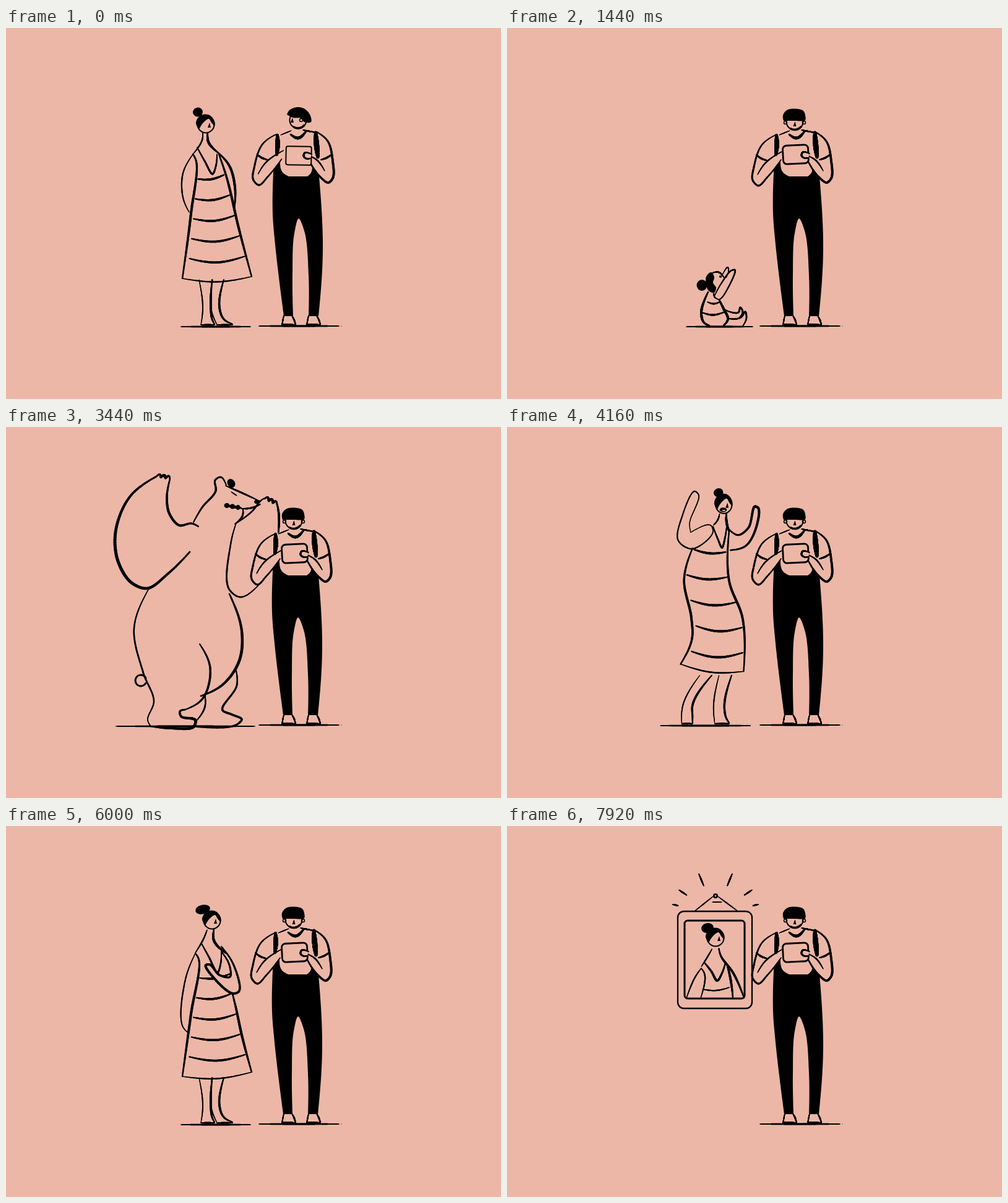
Animation of 800x600 px, one loop 8 s. Source, as an HTML page with a canvas:

```html
<!DOCTYPE html>
<html lang="en">
<head>
<meta charset="utf-8">
<title>Shape shifter</title>
<style>
html, body { margin: 0; width: 100%; height: 100%; overflow: hidden; background: #ecb7a6; }
canvas { display: block; }
</style>
</head>
<body>
<canvas id="stage" width="800" height="600"></canvas>
<script>
const ctx = document.getElementById('stage').getContext('2d');
const PAPER = '#ecb7a6', INK = '#000', FLOOR = 480;
const LOOP = 8000, CYCLE = 5760, STEP = 80, SAMPLES = 80;
const SWAP = { baby: 960, portrait: 1840, bear: 3120, shout: 4000 };

const clamp = v => Math.max(0, Math.min(1, v));
const smooth = v => { v = clamp(v); return v * v * (3 - 2 * v); };
const lerp = (a, b, k) => a + (b - a) * k;
const mix = (a, b, k) => Array.isArray(a) ? a.map((v, i) => mix(v, b[i], k)) : lerp(a, b, k);

// Smooth curve through a few points, sampled evenly; knots follow the chord lengths.
function through(pts) {
  const n = pts.length - 1;
  const h = [], d = [], m = [];
  for (let i = 0; i < n; i++) {
    const [a, b] = [pts[i], pts[i + 1]];
    h[i] = Math.hypot(b[0] - a[0], b[1] - a[1]) ** 0.7 || 0.01;
    d[i] = [0, 1].map(j => (b[j] - a[j]) / h[i]);
  }
  for (let i = 1; i < n; i++) m[i] = mix(d[i - 1], d[i], h[i - 1] / (h[i - 1] + h[i]));
  m[0] = n > 1 ? mix(m[1], d[0], 1.6) : d[0];
  m[n] = n > 1 ? mix(m[n - 1], d[n - 1], 1.6) : d[0];
  const total = h.reduce((a, b) => a + b), out = [];
  for (let s = 0; s <= SAMPLES; s++) {
    let t = total * s / SAMPLES, i = 0;
    while (i < n - 1 && t > h[i]) t -= h[i++];
    const u = t / h[i], v = 1 - u;
    out.push([0, 1].map(j =>
      v * v * (1 + 2 * u) * pts[i][j] + u * u * (3 - 2 * u) * pts[i + 1][j] +
      h[i] * u * v * (v * m[i][j] - u * m[i + 1][j])));
  }
  return out;
}

const cache = {};
function points(text) {
  const v = text.split(' ').map(Number);
  return v.filter((_, i) => i % 2 === 0).map((x, i) => [x, v[2 * i + 1]]);
}
const curve = text => cache[text] ||= through(points(text));
const asCurve = c => typeof c === 'string' ? curve(c) : c;

// Brush line: full in the middle, thin at the ends.
function ink(line, width = 2.5) {
  const c = asCurve(line);
  for (let i = 1; i < c.length; i++) {
    ctx.lineWidth = width * (0.55 + 0.45 * Math.sin(Math.PI * i / c.length));
    ctx.beginPath();
    ctx.moveTo(...c[i - 1]);
    ctx.lineTo(...c[i]);
    ctx.stroke();
  }
}
const inkAll = (lines, width) => lines.forEach(l => ink(l, width));

function fill(pts, color = INK) {
  ctx.fillStyle = color;
  ctx.beginPath();
  pts.forEach(p => ctx.lineTo(...p));
  ctx.fill();
}
function filled(line, width) {
  fill(asCurve(line), PAPER);
  ink(line, width);
}
function oval(x, y, rx, ry = rx, color = INK, angle = 0) {
  ctx.fillStyle = color;
  ctx.beginPath();
  ctx.ellipse(x, y, rx, ry, angle, 0, 7);
  ctx.fill();
}
function ring(x, y, r, width, from = 0, to = 7) {
  ctx.lineWidth = width;
  ctx.beginPath();
  ctx.arc(x, y, r, from, to);
  ctx.stroke();
}
function panel(x, y, w, h, r, width) {
  ctx.beginPath();
  ctx.roundRect(x - w / 2, y - h / 2, w, h, r);
  ctx.fillStyle = PAPER;
  ctx.fill();
  ctx.lineWidth = width;
  ctx.stroke();
}
function nose(x, y) { fill([[x, y], [x - 3, y + 8], [x + 2, y + 8]]); }
function ground(x0, x1, y = 483) { ink(through([[x0, y], [x1, y]]), 3); }

// Runs paint inside a transform around (x, y).
function around(x, y, change, paint) {
  ctx.save();
  ctx.translate(x, y);
  change();
  ctx.translate(-x, -y);
  paint();
  ctx.restore();
}

function makePose(p) {
  for (const key of ['neckL', 'neckR', 'vee', 'armL', 'armR', 'sideL', 'sideR']) p[key] = curve(p[key]);
  return p;
}
// head: x, y, bun x, y, radii; legs: hips, knees, heel, toe; bands: first, step, tilt.
const calm = makePose({
  head: [323, 156, 310, 136, 8, 7.5],
  neckL: '318 169 317 181 303 203',
  neckR: '326 169 327 184 342 201',
  vee: '309 193 321 215 334 236 339 224 341 204',
  armL: '303 203 286 235 286 274 296 298',
  armR: '342 201 361 223 370 257 369 292',
  sideL: '302 204 307 214 299 300 285 405',
  sideR: '344 204 357 243 376 323 397 402',
  legs: [[312, 333, 318, 331, 315, 337], [334, 352, 331, 345, 341, 366]],
  bands: [0.2, 0.16, -7], floor: [283, 395]
});
const chest = makePose({
  ...calm,
  head: [333, 153, 318, 135, 12, 7.5],
  neckL: '325 168 319 183 306 205',
  neckR: '336 168 336 185 356 206',
  vee: '316 190 328 212 342 237 347 222 348 204',
  armL: '306 206 290 248 286 325 294 334',
  armR: '348 195 368 225 376 268 368 271 337 247 323 225 329 224 345 241 362 244 361 225 348 203',
  sideL: '306 206 311 214 299 304 285 405',
  sideR: '366 271 372 296 381 338 397 398'
});
const shout = makePose({
  head: [351, 149, 342, 131, 8, 6.5],
  neckL: '344 163 341 172 334 180',
  neckR: '355 163 356 178 360 190',
  vee: '333 182 341 201 348 214 353 199 356 180',
  armL: '296 191 294 178 309 134 303 129 282 166 275 203 297 216 333 190 330 181 296 191',
  armR: '358 185 375 195 392 184 403 152 408 154 404 186 388 211 362 218',
  sideL: '299 215 285 262 297 320 298 352 279 390',
  sideR: '360 187 360 265 382 320 384 401',
  legs: [[311, 331, 283, 299, 281, 299], [343, 364, 334, 352, 336, 360]],
  bands: [0.01, 0.22, 4], floor: [246, 395]
});
function blend(a, b, k) {
  return Object.fromEntries(Object.keys(a).map(key => [key, mix(a[key], b[key], k)]));
}

function womanHead([x, y, bx, by, rx, ry], yelling) {
  oval(bx, by, rx, ry, INK, -0.2);
  oval(x, y, 14, 14, PAPER);
  ring(x, y, 13.5, 2);
  around(0, 0, () => ctx.translate(x, y), () => {
    fill(curve('-11 8 -16 -3 -8 -15 6 -15 14 -5 14 2 9 -3 5 -9 -4 -3 -11 8'));
    nose(6, -3);
    if (yelling) {
      oval(-1, 8, 6, 3.5);
      oval(0, 9, 3, 1, PAPER);
    }
  });
}

function leg([hipBack, hipFront, kneeBack, kneeFront, heel, toe]) {
  const back = through([[hipBack, 407], [kneeBack, 452], [heel, FLOOR]]);
  const front = through([[hipFront, 407], [kneeFront, 452], [lerp(kneeFront, toe, 0.3), 470], [toe, FLOOR - 1]]);
  ink(back, 2);
  ink(front, 3.5);
  ink(through([[heel, FLOOR], [toe, FLOOR]]), 2.5);
}

const sag = (a, b, depth) => through([a, [(a[0] + b[0]) / 2, (a[1] + b[1]) / 2 + depth], b]);
const edgeAt = (side, y) => (side.find(p => p[1] >= y) || side[SAMPLES])[0];

function drawWoman(w, yelling) {
  const [top, bottom] = [w.sideL[0][1], w.sideL[SAMPLES][1]];
  const [first, step, tilt] = w.bands;
  for (let i = 0; i < 5; i++) {
    const y = lerp(top, bottom, first + step * i), y2 = y + tilt * (1 - i / 8);
    ink(sag([edgeAt(w.sideL, y) + 3 + i, y], [edgeAt(w.sideR, y2) - 3, y2], 4 + i), 3.5);
  }
  ink(w.vee, 3);
  fill(w.armR, PAPER);
  w.legs.forEach(leg);
  ink(sag(w.sideL[SAMPLES], w.sideR[SAMPLES], 7), 2.3);
  inkAll([w.neckL, w.armL], 2.3);
  inkAll([w.neckR, w.armR, w.sideL, w.sideR], 4);
  ground(...w.floor);
  womanHead(w.head, yelling);
}

function drawBaby(p) {
  const raise = (1 - smooth((p - SWAP.baby) / 400)) * 0.9 + Math.sin((p - 1440) / 90) * 0.08;
  inkAll(['332 396 342 395 351 404', '334 429 336 435 341 438', '324 443 334 446 344 443'], 2.5);
  inkAll(['325 427 314 462 318 476 327 481', '342 438 350 454 357 471 350 481'], 4);
  ink('315 460 333 464 352 459', 3);
  inkAll(['350 454 360 459 374 460 377 452 381 459 375 469 358 470', '358 470 378 468 385 459 387 469 381 482'], 2.8);
  ground(290, 397);
  oval(315, 416, 8.5, 9);
  fill(curve('322 414 322 402 330 395 335 403 333 412 338 420 335 428 326 425 322 414'));
  oval(345, 402, 2);
  around(338, 434, () => ctx.rotate(raise), () => {
    filled('335 434 347 412 363 392 368 391 360 415 342 439 335 434', 2.5);
    ink('346 403 357 387 358 393 354 404', 1.8);
  });
}

function drawRays(p) {
  if (p < 1920 || p > 2320) return;
  const age = (p - 2160) / 160, fade = 1 - Math.max(0, age) * 0.6, reach = 71 + 4 * age;
  [0.39, 0.98, 1.34].forEach((angle, i) => {
    for (const side of [-1, 1]) {
      const at = r => [337 + side * r * Math.sin(angle), 143 - r * Math.cos(angle)];
      ink(through([at(reach), at(reach - (21 - 6 * i) * fade)]), 2.5);
    }
  });
  ink('332 123 347 123', 1.2);
}

function drawPortrait(p) {
  const k = smooth((p - 2160) / 400), settle = smooth((p - 2560) / 160);
  const top = lerp(138, 135, k);
  panel(336, (top + 295) / 2, lerp(120, 124, k), 295 - top, 10, 2.3);
  panel(lerp(335.5, 334, k), lerp(216, 214, k), lerp(97, 102, k), lerp(126, 130, k), 5, lerp(3, 2, k));
  ink(through([[lerp(304, 295, k), top - 1], [333, 114]]), 1.8);
  ink(through([[341, 114], [lerp(372, 379, k), top - 1]]), 1.8);
  oval(337, 113, 4);
  oval(337, 113, 1.3, 1.3, PAPER);
  around(0, 279, () => ctx.transform(1, 0, -0.14 * (1 - k), 1, 0, 0), () => {
    inkAll(['320 199 314 213 307 227', '307 230 299 245 290 278', '307 230 314 240 313 278', '314 264 336 266 357 261'], 2.3);
    inkAll(['331 198 336 210 360 238 383 278', '311 221 324 235 336 250 342 237 345 220', '347 222 357 248 365 278'], 3.5);
  });
  const head = mix([337, 181, 324, 165, 10, 8], [324, 184, 311, 167, 7.5, 7], k);
  head[0] -= settle;
  head[2] -= settle;
  womanHead(head);
  drawRays(p);
}

function claws(x0, y0, x1, y1) {
  const pts = [];
  for (let i = 0; i <= SAMPLES; i++) {
    const u = i / SAMPLES, bump = 4 * Math.abs(Math.sin(3 * Math.PI * u));
    pts.push([lerp(x0, x1, u) + bump * 0.4, lerp(y0, y1, u) - bump]);
  }
  ink(pts, 4);
}

function drawBear(p) {
  inkAll(['230 263 207 325 222 398 239 444 229 474 234 484', '372 155 363 190 361 263 378 275 409 255'], 2.8);
  inkAll(['234 484 265 487 304 484 306 474 283 468 281 460 290 457', '361 270 381 330 377 378 351 416 315 435'], 4.5);
  inkAll(['290 457 318 439 330 390 313 351', '371 390 373 418 350 458 365 465 381 473 375 480 308 485'], 3.5);
  ink('322 435 321 454 308 475', 2.5);
  ground(178, 402, 484);
  ring(218, 410, 9, 3, 0.5, 5.8);

  ink('303 154 317 130 339 103 338 86 347 81 356 94', 3.2);
  inkAll(['355 95 378 105 406 118', '411 125 396 131 380 132', '383 133 382 144 370 157'], 2.8);
  ink('364 105 373 111', 1.5);
  oval(364, 91, 6, 7.5, INK, -0.6);
  oval(406, 121, 5, 3.5);
  for (let i = 0; i < 3; i++) oval(357 + 9 * i, 127 + 1.5 * i, 4.5 - 0.6 * i, 4);
  ink('355 127 380 131', 4);

  around(0, 200, () => ctx.scale(1, 1 + 0.03 * Math.sin((p - 3440) / 100)), () => {
    ink('311 161 300 156 280 159 264 140 260 115 265 84', 4);
    ink('243 80 200 113 177 170 181 217 203 252 228 261 262 237 297 202', 5);
    ink('370 157 398 136 412 119 420 114', 2.5);
    ink('437 120 441 142 440 174', 3.5);
    claws(265, 84, 243, 80);
    claws(418, 116, 438, 126);
  });
}

const overalls = [
  '432 214 430 300 434 350 448 466', '448 466 463 466', '463 466 462 400 465 332 472 308 481 328 488 400 488 466',
  '488 466 504 466', '504 466 511 360 505 240', '505 240 496 222', '494 220 492 234 486 240', '486 240 456 240', '456 240 445 232 442 214'
].flatMap(curve);

function shoe(x) {
  ink(through([[x + 3, 465], [x, FLOOR]]), 2);
  ink(through([[x + 16, 465], [x + 20, 473], [x + 22, FLOOR]]), 2.5);
  ink(through([[x, FLOOR], [x + 22, FLOOR + 0.5]]), 4);
}

function manHead(looking) {
  const [x, y] = looking ? [472, 149] : [465, 151.5];
  oval(x, y, 14, 14, PAPER);
  ring(x, y, 13.5, 2);
  ring(x, y, 13, 3.5, 0.7, 2.1);
  if (looking) {
    fill(curve('454 140 458 133 470 128 483 131 492 142 493 152 482 152 477 146 464 145 454 140'));
    ring(477, 149, 2.5, 1.5);
    nose(463, 145);
  } else {
    fill(curve('447 150 446 141 452 133 465 130.5 479 134 482 141 482 149 465 150 447 150'));
    for (const side of [-1, 1]) ring(x + 15 * side, 153, 2.5, 1.5);
    nose(465.5, 151);
  }
}

function drawMan(p) {
  const turn = p < 240 ? 1 - p / 240 : clamp((p - 4560) / 160);
  const wide = p > 4560 ? turn : 0, looking = turn >= 0.5;
  const tap = Object.values(SWAP).reduce((s, t) => s + Math.sin(Math.PI * clamp((p - t + 280) / 320)), 0);
  fill(points('434 173 456 167 480 166 500 169 506 246 432 246'), PAPER);
  around(0, 0, () => ctx.translate(turn, 0), () => fill(overalls));
  shoe(446);
  shoe(486);
  ground(409, 538, 482);
  oval(542, 482, 0.6);

  around(0, 0, () => ctx.translate(2.5 * turn, -turn), () => {
    filled('434 173 412 189 399 225 397 246 406 255 421 241 443 213', 3);
    ink('405 237 418 218 446 199', 2.3);
    ink('403 205 411 211 420 214', 3);
  });
  const reach = () => { ctx.translate(4 * turn + wide + 2 * tap, -tap); ctx.scale(1 + 0.25 * wide, 1); };
  around(500, 200, reach, () => {
    filled('498 168 516 183 524 215 524 243 517 250 504 241 484 211', 3.8);
    ink('487 207 499 214 511 231', 2.3);
    ink('505 213 514 210 523 204', 3);
  });
  around(0, 0, () => ctx.translate(3 * turn, 0), () => {
    ink('435.5 173 436 188 434.5 205', 7.5);
    ink('497.5 169 499 190 501 209', 8.5);
  });

  around(466.5 + 6.5 * turn + 2 * wide, 204.5 + 2 * turn, () => ctx.rotate(lerp(-0.05, 0.02, turn) + 0.06 * wide), () => {
    ctx.translate(466.5 + 6.5 * turn + 2 * wide, 204.5 + 2 * turn);
    panel(0, 0, 41, 30, lerp(6, 3, turn), lerp(2.8, 2, turn));
  });
  around(0, 0, () => ctx.translate(5 * turn + wide - 2 * tap, turn - 2 * tap), () =>
    filled('489 203 478 201 476 206 480 210 487 210', 3));

  around(0, 0, () => ctx.translate(4 * turn, 0), () => {
    ink('456 172 468 178 481 167', 4.5);
    ink('457 166 440 173', 1.6);
    ink('476 165 486 167 497 169', 2.5);
  });
  manHead(looking);
}

function spring(age) {
  const u = clamp(age / 320);
  return Math.cos(u * 2.5 * Math.PI) * (1 - u) * (1 - u);
}

// Pops in after "from" and flattens just before "to".
function popped(p, from, to, x, y, paint) {
  const leave = clamp((p - to + 240) / 240);
  const s = 0.4 * spring(p - from) + 0.5 * leave * leave;
  around(x, y, () => ctx.scale(1 + s * 0.4, 1 - s), () => paint(p));
}

function drawVisitor(p) {
  if (p < SWAP.baby) {
    const k = smooth(p / 240) + 0.08 * Math.sin(Math.PI * clamp((p - 240) / 320));
    popped(p, -1000, SWAP.baby, 338, 483, () => drawWoman(blend(calm, chest, k)));
  } else if (p < SWAP.portrait) {
    popped(p, SWAP.baby, SWAP.portrait, 343, 483, drawBaby);
  } else if (p < SWAP.bear) {
    popped(p, SWAP.portrait, SWAP.bear, 337, 205, drawPortrait);
  } else if (p < SWAP.shout) {
    popped(p, SWAP.bear, SWAP.shout, 290, 484, drawBear);
  } else {
    const k = smooth((p - 4800) / 480);
    popped(p, SWAP.shout, LOOP, 330, 483, () => drawWoman(blend(shout, calm, k), k < 0.4));
  }
}

function frame(now) {
  const p = Math.floor(now % LOOP / STEP) * STEP % CYCLE;
  ctx.fillStyle = PAPER;
  ctx.fillRect(0, 0, 800, 600);
  ctx.strokeStyle = INK;
  ctx.lineCap = ctx.lineJoin = 'round';
  drawVisitor(p);
  drawMan(p);
}

const start = performance.now();
function tick() {
  frame(performance.now() - start);
  requestAnimationFrame(tick);
}
tick();
</script>
</body>
</html>
```
